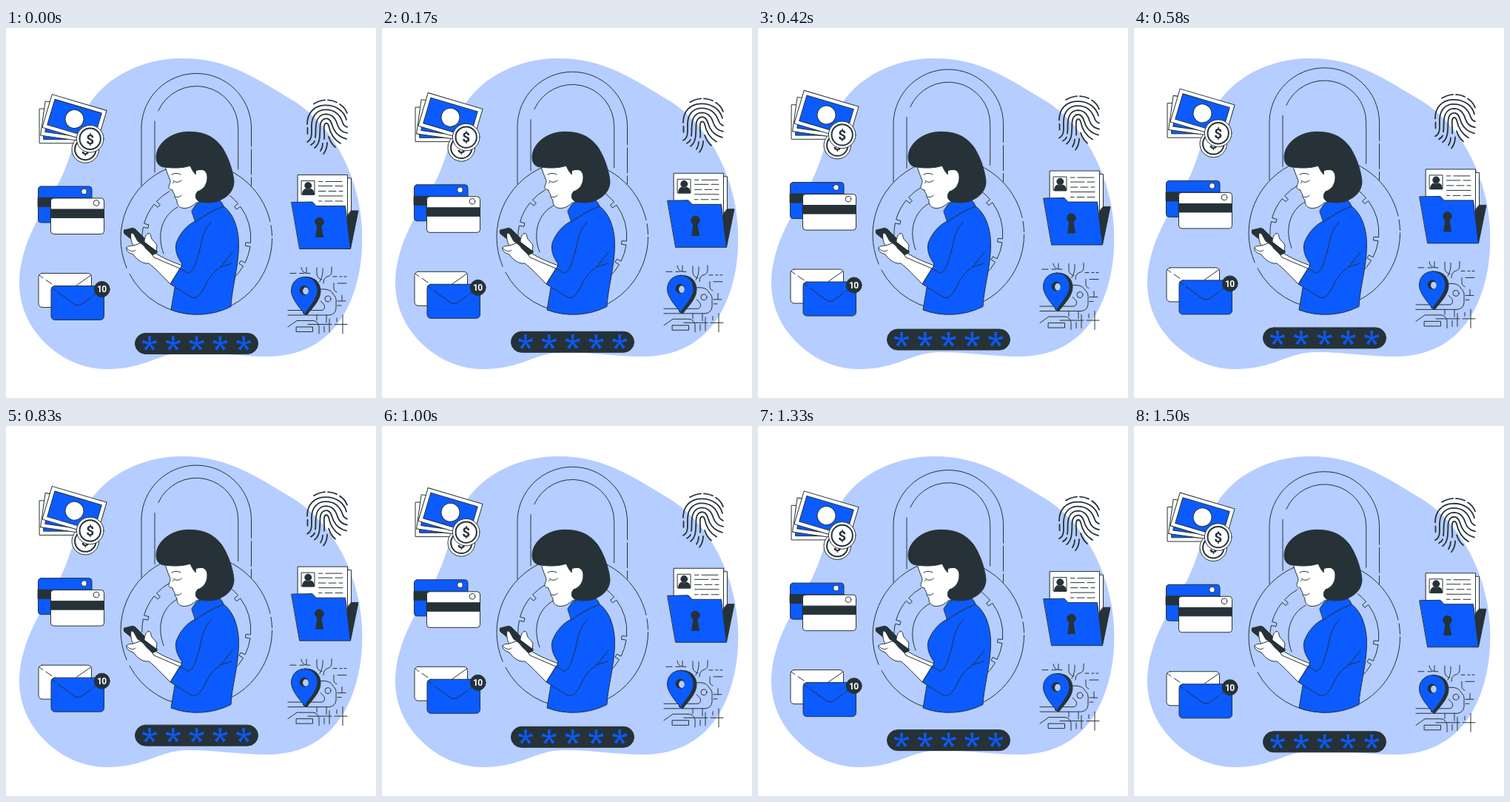
Animation of 500x500 px, one loop 1540 ms. Source, as an HTML page:

```html
<!DOCTYPE html>
<html lang="en">
<head>
<meta charset="utf-8">
<title>Data privacy</title>
<style>
html, body { margin: 0; width: 100%; height: 100%; overflow: hidden; background: #fff; }
svg { display: block; width: 100vw; height: 100vh; }
.ln { fill: none; }
.bl { fill: #0b5bff; }
.wh { fill: #fff; }
.dk { fill: #263238; }
.pale { fill: #b5cdff; }
.bob, .still { stroke: #263238; stroke-width: 1; stroke-linecap: round; stroke-linejoin: round; }
.bob text { stroke: none; font-family: Roboto, "Open Sans", sans-serif; font-weight: 700; font-stretch: condensed; text-anchor: middle; }
.finger { stroke-width: 1.8; }
</style>
</head>
<body>
<svg viewBox="0 0 500 500">
  <path class="pale" d="M238 41C186 41 136 65 112 104C95 137 88 176 73 206C52 243 18 291 18 345C18 411 78 461 136 461C189 461 207 438 247 438C285 438 314 444 352 444C431 444 468 390 479 320C492 233 455 140 388 98C340 70 302 41 238 41Z"/>

  <!-- padlock -->
  <g class="bob ln">
    <path d="M183 213V133A74.3 74.3 0 0 1 331.5 133V160M331.5 164V198M331.5 202V213"/>
    <path d="M201 195V126M205.8 112A56.4 56.4 0 0 1 313.7 135V191"/>
    <circle class="pale" stroke="none" cx="257.3" cy="284.5" r="101.8"/>
    <circle cx="257.3" cy="284.5" r="102.3" pathLength="360" stroke-dasharray="152 5 190 3 8 2"/>
    <path id="dial"/>
    <path d="M232 242C211 253 203 279 213 305"/>
  </g>

  <!-- woman -->
  <g class="still">
    <path class="wh" d="M196 300C207 309 222 315 238 321L230 334L200 312Z"/>
    <path class="bl" d="M256 261C244 266 234 279 230 291C228 302 232 310 238 319L228 351L223 381A102.3 102.3 0 0 0 304 376.500C305 353 314 324 314.500 296C315 270 307 250 293 240Z"/>
    <path class="wh" d="M215 186C217 196 222 204 222 208C221 212 219 215 220.500 217C222 219 224 218 225 219C225 222 228 224 228 226C227 229 231 231 231 234C231 239 234 243 240 243.500C247 244 253 240 257 236L266 234L274 200L250 165Z"/>
    <path class="dk" d="M252 140.500C226 138 203 155 203 175C203 184 209 188 215 188C228 190 241 189 249 186C251 191 254 197 259 200L259 192C266 190 272 192 272 202C272 212 266 219 259 221C255 225 255 232 262 235C285 239 308 228 308 207C306 188 298 170 291 160C281 147 268 141 252 140.500Z"/>
    <path class="wh" stroke="none" d="M257 193C264 190 272 192 272 202C272 212 266 219 259 220L256 208Z"/>
    <path class="ln" d="M259 192C266 190 272 192 272 202C272 212 266 219 259 221M224 198Q230 194.500 236 198M226 206Q231 211 237 206M227 208L225.500 209.500M229 228Q234 230 237 226"/>
    <path class="bl" d="M251 247L257 238L264 235C274 237 283 236 289 233Q293 237 294 241Q273 249 256 262Z"/>
    <!-- phone and hands -->
    <path class="dk" d="M160 273L170 270.500Q173 270 175 272L204 301Q205 304 202 305L196 307L160 278Q158 275 160 273Z"/>
    <path class="wh" d="M187 289C187 284 189 279 192 277.500C195 277 196 280 196 283C197 287 203 290 204 294L203 301Z"/>
    <path class="wh" d="M169 277C173 276 174 282 178 288C182 291 186 293 189 298C193 302 197 305 200 310L235 325L222 346C211 335 202 325 193 318C185 319 178 314 172 306C166 304 162 301 163 297C164 294 169 295 172 294C169 291 168 281 169 277Z"/>
    <path class="ln" d="M163 297C166 302 173 303 175 300M172 294L181 291"/>
    <path class="bl" stroke="none" d="M277 263C263 276 265 293 259 309C255 322 251 332 246 331L235 325L222 346L249 363C258 368 263 360 270 347L290 323L299 295Z"/>
    <path class="ln" d="M277 263C263 276 265 293 259 309C255 322 251 332 246 331L235 325L222 346L249 363C258 368 263 360 270 347C276 334 282 329 290 323L306 303M305 318L290 323"/>
  </g>

  <g class="bob">
    <!-- money -->
    <g id="bills"></g>
    <g id="coins"></g>

    <!-- cards -->
    <rect class="bl" x="43.500" y="214" width="72.500" height="49" rx="4"/>
    <path class="dk" d="M43.500 229.500H116V241.500H43.500Z"/>
    <circle class="wh" cx="105.500" cy="221" r="3.800"/>
    <rect class="wh" x="60.500" y="230" width="72" height="48.500" rx="4"/>
    <path class="dk" d="M60.500 245H132.500V256.500H60.500Z"/>
    <circle class="wh" cx="122" cy="236.500" r="3.800"/>

    <!-- mail -->
    <rect class="wh" x="44" y="331.500" width="71.500" height="46" rx="5"/>
    <path class="ln" d="M45 334L50 338M54 340.500L62 346M115 334L95 348"/>
    <rect class="bl" x="61" y="348.500" width="71.500" height="46" rx="5"/>
    <path class="ln" d="M62 351L67 354.500M70 357L92 373Q98 377 104 372L115 364M118 362L132 352"/>
    <circle class="dk" cx="129.700" cy="353" r="10.500"/>
    <text class="wh" x="129.300" y="357.400" font-size="12" letter-spacing="-.6">10</text>

    <!-- password -->
    <rect class="dk" x="174.500" y="412.500" width="166" height="28" rx="14"/>
    <g id="stars" class="bl" stroke="none"></g>

    <!-- fingerprint -->
    <path class="ln finger" d="M416 102.500C421 99.500 426 98 431 97.500M435 97.500C440 97.700 444 99 447 100.500M451 103C456 106 459 110 461 115M407.500 143V135M407 130C407 115 416 105 431 104.500C447 104 457 113 460 124M407 154C415 150 412.500 140 413 131C413.500 118 421 110.500 432 110.500C445 110.500 452 119 455 128C456 131 458 133 461 134M412 158C414 157 416 156 417 153M418 148C419 142 418 138 419 131C420 122 425 116.500 433 116.500C442 117 446 124 448 131C450 137 455 141 461 142M417 162C425 156 424 145 424.500 133C425 125 429 122 434 122.500C440 124 440 131 443 137C446 143 452 148 460 150M425 166C427 163 428 160 428 156M430 150C431 143 429 138 430 132C431 127 435 128 436 132C438 142 442 150 452 156M429 170C433 165 434 160 434 155M436 147C438 153 440 157 445 161"/>

    <!-- documents -->
    <path class="wh" d="M400 203H466.500V285H400Z"/>
    <path class="dk" d="M466.500 247H476L465.500 298.500L455 262Z"/>
    <path class="wh" d="M394.500 198.500H461.500V280H394.500Z"/>
    <rect class="wh" x="399.500" y="206.500" width="17.500" height="18.500"/>
    <circle class="dk" cx="408.300" cy="213" r="4.500"/>
    <path class="dk" d="M400.500 225Q401 218 405 217.500Q408 219.500 412 217.500Q416 218 416.500 225Z"/>
    <path class="ln" d="M422.500 207.500H428M432 207.500H454M422.500 213.500H441M445 213.500H455M422.500 220.500H432M436 220.500H446M450 220.500H455M422.500 227H455M422.500 234H427M431 234H441M445 234H455"/>
    <path class="bl" d="M386 235.500L414 235L419 240.500H458.500L465.500 298.500H397Z"/>
    <circle class="dk" cx="423.500" cy="262" r="5.800"/>
    <path class="dk" d="M421.500 265H425.500L428.500 282.500H419Z"/>

    <!-- map -->
    <g class="ln">
      <path d="M384 331.500H392M397 331.500H403M399 323.500Q400 331 407 331.500H411M406 323.500V331M420 324V333Q421 339 427 340M424 343Q429 334 428 325M440 323V329Q440 335 434 336Q429 338 429 345M442 336H447M451 336H454M457 336H460"/>
      <path d="M423 353H431Q440 354 442 360Q447 363 446 372V379Q445 387 437 388H381M381 381.500H427Q432 380 430 374L425 369M448 345H460M443 345V351Q443 356 447 357M454 361V369M448 369H459M448 375H453"/>
      <path d="M381 404L393 395.500H415Q421 396 423 403V413M420 388V395M433 388V398M408 400.500H440M444 400.500H461M437 393V411M455 388V413M430 403V411M447 392V397M392.500 404H414.500V410.500H392.500Z"/>
      <circle cx="435" cy="366" r="4"/>
    </g>
    <path class="dk" d="M404 336.500C419 336 425 346 425 356C425 368 413 379 406.500 388L402 386Z"/>
    <path class="bl" d="M403.500 336.500C414 336.500 421 344.500 421 355C421 366 409 378 403.500 386.500C397 378 385.500 366 385.500 355C385.500 344.500 393 336.500 403.500 336.500Z"/>
    <circle class="dk" cx="403" cy="354.500" r="6"/>
    <ellipse class="pale" stroke="none" cx="405" cy="355.300" rx="3.900" ry="4.800"/>
  </g>
</svg>
<script>
const $ = id => document.getElementById(id);
const FRAMES = 37, LOOP = 1540, LIFT = 10;

// point on the padlock dial
function polar(r, deg) {
  const a = deg * Math.PI / 180;
  return (257.3 + r * Math.cos(a)).toFixed(1) + " " + (284.5 + r * Math.sin(a)).toFixed(1);
}

// arc of the dial with small square notches cut inwards
function notched(from, to, notches) {
  const R = 73.5, r = 67;
  let d = "M" + polar(R, from);
  const arc = deg => `A${R} ${R} 0 0 1 ${polar(R, deg)}`;
  for (const a of notches)
    d += arc(a - 2) + "L" + polar(r, a - 2) + "L" + polar(r, a + 2) + "L" + polar(R, a + 2);
  return d + arc(to);
}
$("dial").setAttribute("d", notched(178, 240, [194, 221]) + notched(-52, 48, [-38, 6.5, 28.5]));

function bill(x, y, turn) {
  return `<g transform="translate(${x} ${y}) rotate(${turn})">
    <rect class="wh" x="-38.5" y="-23.300" width="77" height="46.600"/>
    <rect class="bl" x="-33" y="-18" width="66" height="36"/>
    <circle class="wh" r="12.500"/></g>`;
}
$("bills").innerHTML = bill(84, 132.500, 0) + bill(88, 127.400, 8) + bill(92.500, 123, 16.500);

function coin(x, y) {
  return `<g transform="translate(${x} ${y})">
    <circle class="wh" r="18.300"/>
    <circle class="wh" r="14.200" stroke-width="2"/>
    <text class="dk" y="6.800" font-size="19">$</text></g>`;
}
$("coins").innerHTML = coin(107.300, 164) + coin(113.700, 149.800);

const arms = [0, 72, 144, 216, 288]
  .map(a => `<path d="M-1 0L-2.100-10H2.100L1 0Z" transform="rotate(${a})"/>`).join("");
$("stars").innerHTML = [0, 1, 2, 3, 4]
  .map(i => `<g transform="translate(${194 + 31.800 * i} 426.500)">${arms}</g>`).join("");

// everything but the woman floats up and down linearly, 24 steps a second
const floating = document.querySelectorAll(".bob");
function draw(ms) {
  const step = Math.floor(ms % LOOP / LOOP * FRAMES + 0.15) % FRAMES;
  const p = (step + 0.8) / FRAMES;
  const y = 0.4 - LIFT * (1 - Math.abs(1 - 2 * p));
  for (const g of floating) g.setAttribute("transform", `translate(0 ${y.toFixed(2)})`);
}

let start = null;
function tick(now) {
  if (start === null) start = now;
  draw(now - start);
  requestAnimationFrame(tick);
}
draw(0);
requestAnimationFrame(tick);
</script>
</body>
</html>
```
